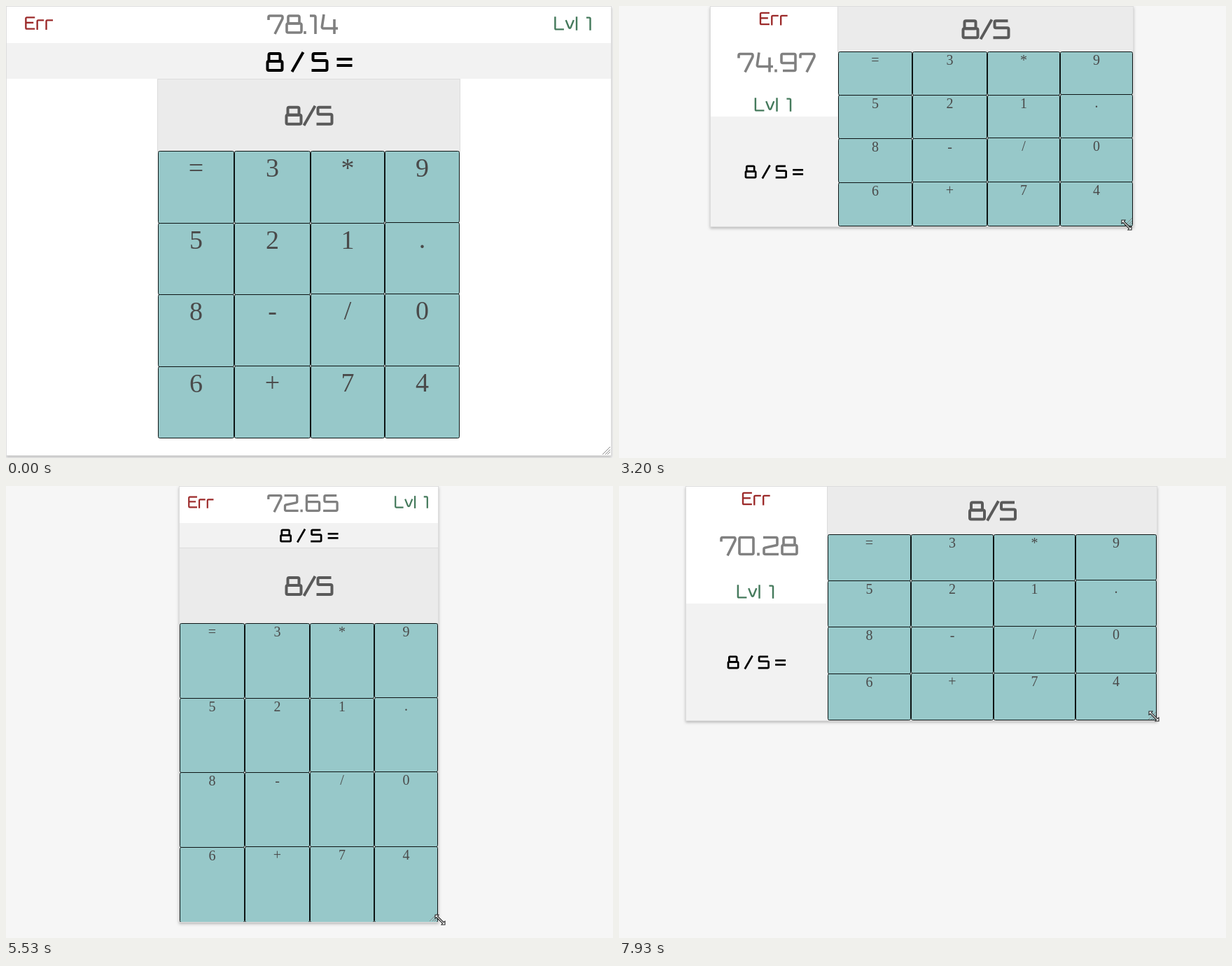
These frames come from a looping animation (867x646 px, 8000 ms). An HTML page with a canvas:

```html
<!DOCTYPE html>
<html lang="en">
<head>
<meta charset="utf-8">
<title>Resizable calculator game</title>
<style>
html, body { margin: 0; width: 100%; height: 100%; overflow: hidden; background: #f6f6f6; }
canvas { display: block; }
</style>
</head>
<body>
<canvas id="stage" width="867" height="646" role="img" aria-label="Calculator: 8 / 5 ="></canvas>
<script>
const ctx = document.getElementById('stage').getContext('2d');
const LOOP = 8000, STEP = LOOP / 120;

// time, box width, box height, pointer offset from the box corner
const POSES = [
  [0, 865, 643, 30, 30], [500, 865, 643, 30, 30], [800, 865, 643, -7, -7], [1790, 865, 643, -7, -7],
  [1933, 865, 642, -13, -30], [1960, 865, 640, -13, -28], [2250, 760, 475], [2600, 648, 326],
  [2850, 585, 302], [3200, 605, 316, -10, -3], [3470, 632, 325], [3850, 715, 470], [4330, 800, 656],
  [4666, 809, 688], [4850, 718, 676], [5200, 460, 634], [5533, 371, 624, 2, -4],
  [6070, 373, 628], [6400, 395, 632, 5, -3], [6600, 489, 634, 37, -4], [6930, 758, 636],
  [7120, 783, 630], [7400, 775, 545], [7800, 715, 375], [7933, 674, 336, -5, -7], [8000, 654, 318]
].map(([t, w, h, dx = -6, dy = -4]) => [t, w, h, dx, dy]);

const CLOCK = [[0, 78.14], [1933, 76.24], [3200, 74.97], [4666, 73.53],
  [5533, 72.65], [6600, 71.6], [7933, 70.28], [8000, 70.21]];

// Square display face on a 28-unit cap height: advance width, then strokes
const GLYPHS = {
  '0': [27, '12 2 22 2 22 26 2 26 2 2 12 2'],
  '1': [16, '1 2 9 2 9 28'],
  '2': [26, '1 2 21 2 21 13 2 17 2 26 23 26'],
  '3': [26, '2 2 20 2 20 13 7 13', '18 13 22 13 22 26 1 26'],
  '4': [27, '5 0 2 20 25 20', '20 7 20 28'],
  '5': [26, '22 2 3 2 3 12 23 12 23 26 1 26'],
  '6': [27, '20 2 2 2 2 26 22 26 22 12 2 12'],
  '7': [26, '2 8 2 2 22 2 22 6 11 28'],
  '8': [26, '12 2 20 2 20 13 4 13 4 2 12 2', '12 13 23 13 23 26 2 26 2 13 12 13'],
  '9': [27, '4 26 22 26 22 2 2 2 2 15 22 15'],
  '.': [8, '2 24 2 28'],
  '/': [18, '1 28 17 0'],
  '=': [24, '1 10 23 10', '1 19 23 19'],
  ' ': [10],
  E: [24, '21 2 2 2 2 26 21 26', '2 13 18 13'],
  r: [19, '2 28 2 8 16 8'],
  L: [23, '2 0 2 26 20 26'],
  v: [21, '1 7 9 27 17 7'],
  l: [11, '2 0 2 28']
};

const KEYS = ['=3*9', '521.', '8-/0', '6+74'];
const COLUMNS = [0, 0.2525, 0.505, 0.7525, 1];

function sample(table, t) {
  const i = Math.max(1, table.findIndex(row => row[0] > t));
  const a = table[i - 1], b = table[i];
  const p = (t - a[0]) / (b[0] - a[0]);
  return a.slice(1).map((v, k) => v + (b[k + 1] - v) * p);
}

function rect(x, y, w, h, fill) {
  ctx.fillStyle = fill;
  ctx.fillRect(x, y, w, h);
}

function polyline(numbers) {
  const n = numbers.split(' ').map(Number), last = n.length - 2;
  ctx.beginPath();
  ctx.moveTo(n[0], n[1]);
  for (let i = 2; i < last; i += 2) ctx.arcTo(n[i], n[i + 1], n[i + 2], n[i + 3], 2);
  ctx.lineTo(n[last], n[last + 1]);
  ctx.stroke();
}

const textWidth = text => [...text].reduce((sum, c) => sum + GLYPHS[c][0], 0) - 2;

// align: 0 left, 0.5 centre, 1 right; y is the middle of the capitals
function write(text, x, y, cap, color, align = 0.5, weight = 4) {
  const scale = cap / 28;
  ctx.save();
  ctx.translate(x - textWidth(text) * scale * align, y - cap / 2);
  ctx.scale(scale, scale);
  ctx.strokeStyle = color;
  ctx.lineWidth = weight;
  for (const c of text) {
    const [advance, ...strokes] = GLYPHS[c];
    strokes.forEach(polyline);
    ctx.translate(advance, 0);
  }
  ctx.restore();
}

function display(x, y, w, h) {
  rect(x, y, w, h, '#ebebeb');
  ctx.strokeStyle = '#dcdcdc';
  ctx.lineWidth = 1;
  ctx.strokeRect(Math.floor(x) + 0.5, Math.floor(y) + 0.5, Math.round(w) - 1, h);
  write('8/5', x + w / 2, y + h / 2 + 1, 28, '#5a5a5a');
}

function keypad(x, y, w, row, size) {
  const left = c => Math.round(x + COLUMNS[c] * w);
  const top = (r, c) => Math.round(y + r * row) - (r > 0 && r < 4 && r + c >= 4 ? 1 : 0);
  ctx.font = `${size}px "Liberation Serif", serif`;
  ctx.textAlign = 'center';
  ctx.lineWidth = 1;
  ctx.strokeStyle = '#0c1414';
  KEYS.forEach((keys, r) => [...keys].forEach((key, c) => {
    const x0 = left(c), x1 = left(c + 1), y0 = top(r, c), y1 = top(r + 1, c);
    ctx.beginPath();
    ctx.roundRect(x0 + 0.5, y0 + 0.5, x1 - x0 - 1, y1 - y0, 2);
    ctx.fillStyle = '#97c8c9';
    ctx.fill();
    ctx.stroke();
    ctx.fillStyle = '#4a4a4a';
    ctx.fillText(key, (x0 + x1) / 2, y0 + size * 0.97);
  }));
}

function landscape(x, w, h, time) {
  const side = Math.round(w * 0.3), mid = x + side / 2, row = h * 0.1972;
  const screen = h - 2 - 4 * row;
  rect(x, 0, side, h / 2, '#fff');
  rect(x, h / 2, side, h / 2, '#f2f2f2');
  write('Err', mid, 18, 19, '#9c2a2a', 0.5, 3.5);
  write(time, mid - 52, h / 4 + 1.5, 28, '#808080', 0, 3.6);
  write('Lvl 1', mid, h / 2 - 17, 19.5, '#457a5c', 0.5, 3.5);
  write('8 / 5 =', mid, h * 0.75, 19, '#000');
  display(x + side, 0, w - side, screen);
  keypad(x + side + 1, screen, w - side - 2, row, 20);
}

function portrait(x, w, h, time) {
  const narrow = w < 600;
  const margin = narrow ? 13 : 27, k = narrow ? 0.91 : 1;
  const bar = narrow ? 35 : 51, top = 53 + bar, mid = x + w / 2;
  const row = h * (narrow ? 0.1712 : 0.1593);
  const padW = narrow ? w : w / 2, padX = mid - padW / 2;
  rect(x, 0, w, h, '#fff');
  rect(x, 53, w, bar, '#f2f2f2');
  write('Err', x + margin, narrow ? 23 : 24.5, 19 * k, '#9c2a2a', 0, 3.5);
  write(time, mid - 59.5, narrow ? 24.5 : 26, 28 * k, '#808080', 0, 3.6);
  write('Lvl 1', x + w - margin, narrow ? 23 : 25, 19.5 * k, '#457a5c', 1, 3.5);
  write('8 / 5 =', mid, narrow ? 71 : 80, narrow ? 19 : 28, '#000');
  display(padX, top, padW, row + 1);
  keypad(padX + 1, top + row + 1, padW - 2, row, narrow ? 20 : 38);
}

function grip(x, y) {
  ctx.strokeStyle = '#8a8a8a';
  ctx.lineWidth = 1;
  ctx.beginPath();
  for (const d of [4, 7, 11]) {
    ctx.moveTo(x - 2 - d, y - 2);
    ctx.lineTo(x - 2, y - 2 - d);
  }
  ctx.stroke();
}

const RESIZE = new Path2D('M-7-7H-2L-3.5-5 5 3.5 7 2V7H2L3.5 5-5-3.5-7-2Z');
const ARROW = new Path2D('M0 0V13L3 10 5 15 7 14 5 9.5H9Z');

function pointer(x, y, shape) {
  ctx.save();
  ctx.translate(x, y);
  ctx.fillStyle = '#fff';
  ctx.strokeStyle = '#222';
  ctx.lineWidth = 1.1;
  ctx.fill(shape);
  ctx.stroke(shape);
  ctx.restore();
}

function draw(t) {
  const pose = sample(POSES, t);
  const w = Math.round(pose[0]), h = Math.round(pose[1]);
  const x = Math.floor(432.5 - w / 2);
  const time = sample(CLOCK, t)[0].toFixed(2);

  rect(0, 0, 867, 646, '#f6f6f6');
  ctx.save();
  ctx.shadowColor = 'rgba(0,0,0,.25)';
  ctx.shadowBlur = 4;
  ctx.shadowOffsetY = 2;
  rect(x, 0, w, h, '#f6f6f6');
  ctx.restore();

  ctx.save();
  ctx.beginPath();
  ctx.rect(x, 0, w, h);
  ctx.clip();
  if (h < 420) landscape(x, w, h, time);
  else {
    // The contents reflow slightly ahead of the frame
    const inner = Math.round(sample(POSES, Math.min(t + 12, LOOP - 1))[0]);
    portrait(x, inner, h, time);
  }
  ctx.restore();

  ctx.strokeStyle = '#ddd';
  ctx.lineWidth = 1;
  ctx.strokeRect(x + 0.5, 0.5, w - 1, h - 1);
  grip(x + w, h);
  pointer(x + w + pose[2], h + pose[3], pose[2] > 12 ? ARROW : RESIZE);
}

const start = performance.now();
function tick() {
  const t = (performance.now() - start) % LOOP;
  draw(Math.min(119, Math.floor((t + 4) / STEP)) * STEP);
  requestAnimationFrame(tick);
}
tick();
</script>
</body>
</html>
```
